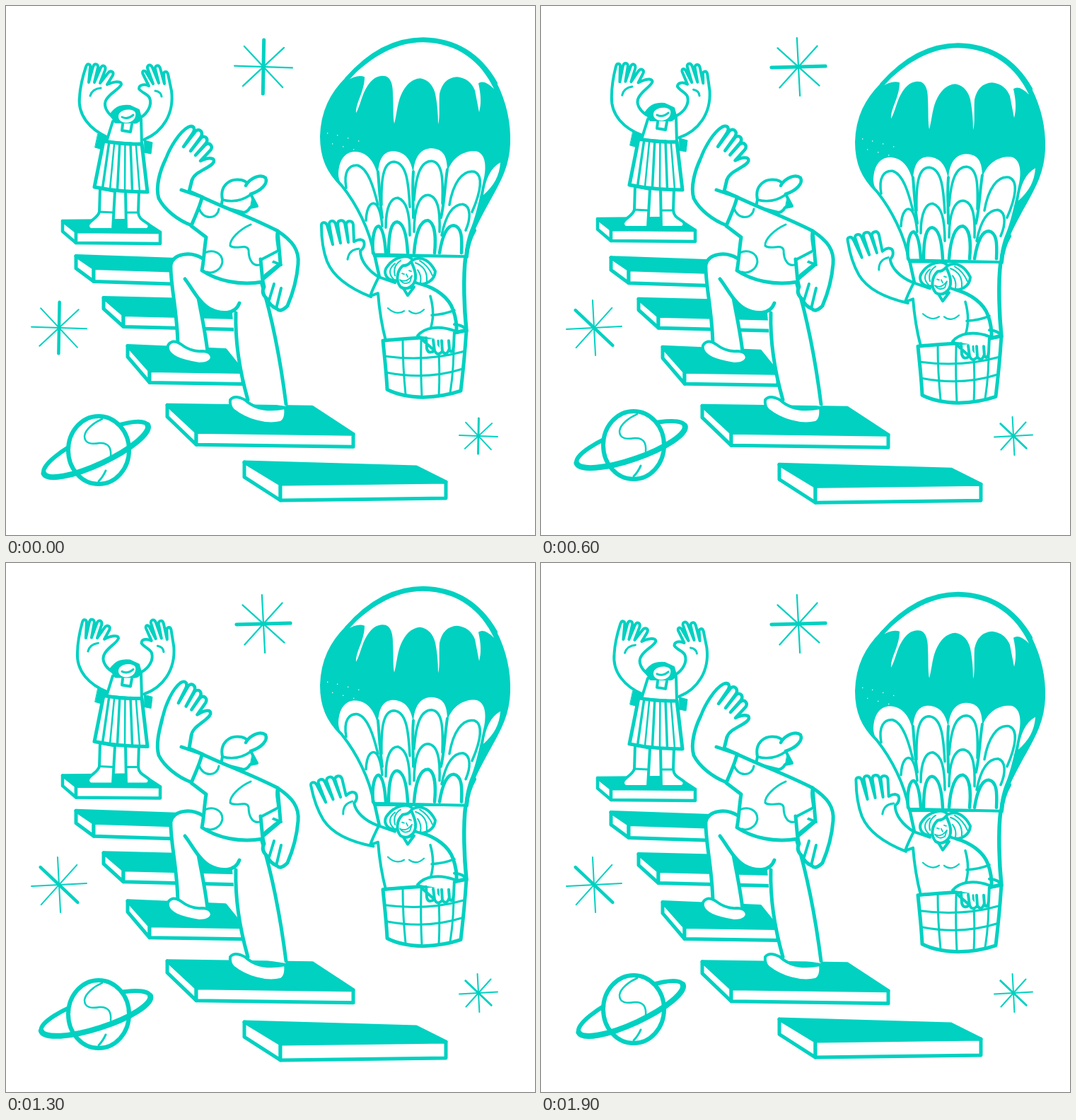
An HTML page with a canvas that plays this animation: 748 px wide and 748 px high, repeating every 2 s.

```html
<!DOCTYPE html>
<html lang="en">
<head>
<meta charset="utf-8">
<title>Stairs and balloon</title>
<style>
html, body { margin: 0; width: 100%; height: 100%; overflow: hidden; background: #fff; }
canvas { display: block; width: 100vmin; height: 100vmin; }
</style>
</head>
<body>
<canvas id="stage" width="748" height="748"></canvas>
<script>
const g = document.getElementById('stage').getContext('2d');
const TEAL = '#00d1c1', WHITE = '#fff', LOOP = 2000, STEP = 100;
const TAU = Math.PI * 2, RAD = Math.PI / 180;
g.lineCap = g.lineJoin = 'round';
g.strokeStyle = TEAL;

// Stroke a path, optionally filling it first.
function ink(d, w, fill) {
  const p = new Path2D(d);
  if (fill) { g.fillStyle = fill; g.fill(p); }
  if (w) { g.lineWidth = w; g.stroke(p); }
}

function moved(dx, dy, draw) {
  g.save();
  g.translate(dx, dy);
  draw();
  g.restore();
}

function turned(x, y, deg, draw) {
  g.save();
  g.translate(x, y);
  g.rotate(deg * RAD);
  g.translate(-x, -y);
  draw();
  g.restore();
}

function turnPoint(px, py, x, y, deg) {
  const c = Math.cos(deg * RAD), s = Math.sin(deg * RAD);
  return [x + (px - x) * c - (py - y) * s, y + (px - x) * s + (py - y) * c];
}

// Smooth interpolation through [time, value] pairs.
function keyed(keys, t) {
  const i = keys.findIndex(k => k[0] > t);
  const [t0, a] = keys[i - 1], [t1, b] = keys[i];
  return a + (b - a) * (1 - Math.cos(Math.PI * (t - t0) / (t1 - t0))) / 2;
}

const WAVE = [[0, 0], [200, -8], [600, -1], [900, -3], [1100, -10], [1600, -4], [1900, 0], [2001, 0]];

// Four spokes; the bold one jumps to a new direction with each pose.
function star(x, y, r, order, bold, thin, pose) {
  const tilt = [2, -2, 3, -3][pose];
  for (let i = 0; i < 4; i++) {
    const heavy = i === order[pose];
    const a = (i * 45 + (heavy ? tilt / 2 : tilt)) * RAD;
    const len = heavy ? r * .93 : i % 2 ? r * .97 : r;
    const dx = Math.cos(a) * len, dy = Math.sin(a) * len;
    ink(`M${x - dx} ${y - dy}L${x + dx} ${y + dy}`, heavy ? bold : thin);
  }
}

function planet(angle) {
  const x = 127, y = 627;
  const ring = (from, to, w) => {
    g.beginPath();
    g.ellipse(x, y, 81, 21, angle * RAD, from, to);
    g.lineWidth = w;
    g.stroke();
  };
  ring(Math.PI, TAU, 6);
  g.beginPath();
  g.ellipse(131, 628, 43, 48, 0, 0, TAU);
  g.fillStyle = WHITE;
  g.fill();
  g.lineWidth = 6;
  g.stroke();
  ink('M136 584C124 589 112 599 111 608C111 619 121 620 132 618C146 617 149 626 148 637', 2.5);
  ink('M141 657Q137 666 131 672', 3);
  ring(0, Math.PI, 8);
}

function slab(bx, by, fx, fy, rx, ry, kx, ky, h, w = 5) {
  const low = h * .92;
  ink(`M${bx} ${by}L${kx} ${ky}L${rx} ${ry}L${fx} ${fy}Z`, w, TEAL);
  ink(`M${bx} ${by}L${fx} ${fy}V${fy + h}L${bx} ${by + low}Z`, w, WHITE);
  ink(`M${fx} ${fy}L${rx} ${ry}V${ry + h}L${fx} ${fy + h}Z`, w, WHITE);
}

function girl(open) {
  ink('M130 181L143 186L140 204L126 200ZM196 190L207 193L205 209L195 207Z', 1, TEAL);
  ink('M133 258L132 291C130 300 118 303 116 310Q116 316 121 316H151L154 262Z', 4, WHITE);
  ink('M169 262L170 316H199Q204 314 202 309C195 303 188 302 187 292L188 260Z', 4, WHITE);
  ink('M132 291L152 292M170 292L187 292', 3);
  turned(146, 188, -4.5 * open, () => {
    ink('M144 186C118 174 101 154 104 128C105 114 109 98 113 86C115 80 120 82 119 87L117 108L123 86C125 80 131 82 130 87L125 108L134 87C137 82 142 85 140 91L133 109L144 95C148 90 153 93 151 98L143 111C152 107 163 105 163 111C160 118 148 122 142 132C137 140 142 150 151 157', 4, WHITE);
    ink('M119 127Q122 117 134 116', 3);
  });
  turned(194, 190, 4.2 * open, () => {
    ink('M195 189C222 178 238 152 234 120L229 96C227 91 222 93 223 98L224 110L218 88C216 82 210 84 211 89L216 109L207 87C204 81 199 84 200 88L208 110L199 95C196 89 191 92 194 97L202 113C196 110 188 111 188 117C192 123 200 124 203 130C207 140 200 152 190 158', 4, WHITE);
    ink('M211 120Q219 121 220 128', 3);
  });
  ink('M151 163L142 192L192 196L191 160Z', 4, WHITE);
  ink('M147 154C156 141 165 140 175 141L188 147L191 158Q187 167 179 165L155 165Z', 2, TEAL);
  ink('M160 152C166 145 180 145 183 151C185 160 176 166 169 165C161 164 157 159 160 152Z', 0, WHITE);
  ink('M164 157Q172 161 180 154', 3);
  ink('M165 167L164 176L176 178L178 167', 4, WHITE);
  ink('M138 191Q166 196 192 195L200 263Q160 263 125 256Z', 5, WHITE);
  for (let i = 1; i < 7; i++) {
    ink(`M${138 + i * 7.6} 194L${126 + i * 10.5} ${257 + i * .8}`, i % 2 ? 3.5 : 2.5);
  }
}

function man(wave) {
  // left leg and shoe
  ink('M278 356C262 347 237 349 233 366C231 388 242 430 243 478L285 492C282 462 278 440 272 415L300 432L362 392L280 372Z', 0, WHITE);
  ink('M278 357C262 347 237 349 233 366C232 392 242 430 243 478M272 413C277 440 282 462 285 489', 5);
  ink('M229 480Q235 470 247 478C256 485 266 489 277 488Q290 488 291 497Q289 506 273 506C250 502 226 496 229 480Z', 4, WHITE);
  // right leg and shoe
  ink('M276 372L255 388L285 428L320 434C323 470 326 512 342 558L396 566C390 505 377 440 362 390Z', 0, WHITE);
  ink('M317 557Q323 549 338 557C352 570 372 573 395 568Q397 585 388 589C368 594 340 586 321 571Q316 566 317 557Z', 4, WHITE);
  ink('M253 386C262 397 273 420 288 428C303 436 324 437 330 420M325 434C324 470 330 515 342 557M361 390C376 440 388 500 396 563', 5);
  // right arm
  ink('M384 318C405 332 415 345 413 365C411 390 404 410 398 424Q388 434 383 428Q373 424 369 414Q360 406 365 397L362 385L388 364Z', 5, WHITE);
  ink('M389 399L382 428M379 393L372 416M362 388L388 366M364 356L389 366', 4);
  // raised arm and hand
  const [jx, jy] = turnPoint(226, 216, 240, 250, wave);
  const [wx, wy] = turnPoint(263, 246, 240, 250, wave);
  ink(`M283 326L262 310C243 303 224 288 216 272C211 255 218 232 ${jx} ${jy}L${wx} ${wy}L259 262L277 270Z`, 0, WHITE);
  ink(`M283 326L262 310C243 303 224 288 216 272C211 255 218 232 ${jx} ${jy}M${wx} ${wy}L259 262L277 270`, 5);
  turned(240, 250, wave, () => {
    ink('M226 216C232 200 245 178 258 171C266 168 268 174 264 180L251 199L268 177C274 172 280 179 275 186L261 205L276 186C283 182 287 189 282 195L268 211L282 196C289 192 293 199 289 204L275 219C285 214 294 214 294 219C294 225 280 230 270 237C265 241 264 243 263 246', 4.5, WHITE);
  });
  // head
  ink('M304 284L306 274C302 254 316 243 333 246C343 248 347 258 347 268L355 283L345 285Q342 291 336 292Z', 4, WHITE);
  ink('M339 254C345 243 360 237 367 243C371 251 361 261 346 266', 4.5, WHITE);
  ink('M306 274Q328 280 347 266', 3.5);
  ink('M348 272L355 283L346 283Z', 1, TEAL);
  // shirt
  ink('M248 260L277 270C305 284 345 298 384 318L386 347L362 384V392C330 395 296 388 277 374L282 328L262 310L276 271', 0, WHITE);
  ink('M248 260L277 270C305 284 345 298 384 318M277 271C274 285 266 300 262 311L283 327C280 345 280 360 277 374C298 388 330 396 363 390L360 358', 5);
  ink('M384 318C381 328 385 336 385 346L362 358', 4);
  ink('M346 309C330 316 316 330 317 339C325 346 340 335 343 345C343 360 350 370 361 365M281 349C292 344 306 348 306 362C304 374 292 379 284 376M273 286C278 303 299 302 301 287', 3);
}

function envelope() {
  const skin = 'M446 185C447 150 460 125 482 103C510 72 545 48 590 48C640 49 672 75 692 110C706 138 712 165 711 195C710 225 700 245 680 280C665 308 655 325 651 355L520 352C515 318 495 280 475 255C455 235 446 215 446 185Z';
  ink(skin, 0, TEAL);
  ink('M481 107Q497 97 507 101C507 122 494 138 495 152C501 142 503 126 511 114Q522 97 537 100Q547 104 547 125C548 145 547 158 549 167C552 158 553 140 558 128Q568 104 586 103Q602 106 607 125Q611 145 611 168C614 160 612 140 613 125Q618 102 638 101Q656 103 663 120L669 151C672 140 672 128 668 110Q676 104 690 118C672 80 640 53 590 52C545 52 512 78 481 107Z', 0, WHITE);
  ink('M470 238C471 213 484 205 497 207C512 209 522 222 526 243C526 215 535 206 548 206C566 207 573 220 576 238C577 212 588 202 602 202C618 203 624 212 624 235C632 212 650 205 664 206C678 208 681 228 674 252C672 262 664 302 656 318C651 332 649 343 649 355L522 352C515 320 499 285 482 262C474 254 470 248 470 238Z', 0, WHITE);
  ink('M699 222C685 230 678 245 675 268C690 255 698 240 699 222Z', 0, WHITE);
  ink('M526 235C528 260 529 280 532 300M576 235C574 260 576 280 576 300M624 232C620 258 620 280 615 300', 4);
  ink('M481 258C477 235 485 225 497 226C512 230 520 258 526 282M531 282C530 240 535 221 549 221C566 223 569 248 571 285M577 275C580 235 588 220 602 220C618 222 618 248 617 280M627 282C632 252 645 232 662 235C675 240 672 262 659 292', 3.5);
  ink('M509 304C510 282 518 276 524 282Q530 290 532 312M537 314C537 283 545 272 554 272C566 276 571 292 571 325M577 320C577 285 585 268 597 268C611 270 614 290 613 320M616 325C622 295 632 281 646 281C658 284 657 302 650 318', 3.5);
  ink('M519 350C517 325 522 312 527 312C534 316 536 335 537 350M541 350C541 322 545 306 553 306C564 308 567 330 568 350M577 350C579 322 586 303 597 304C607 308 608 330 606 350M613 350C617 325 624 311 633 311C645 313 645 330 644 350', 4.5);
  ink(skin, 4);
  ink('M482 104C510 72 545 48 590 48C640 49 672 75 692 110M662 318C655 330 652 342 651 355', 6);
  for (let i = 0; i < 7; i++) {
    g.fillStyle = WHITE;
    g.fillRect(454 + i * 37 % 52, 180 + i * 23 % 27, 1.3, 1.3);
  }
}

function woman(arm) {
  turned(522, 395, arm, () => {
    ink('M527 384C511 374 501 360 501 347C508 342 509 332 501 331C496 331 494 333 492 334L491 310C490 303 482 304 481 309L484 335L479 308C477 302 469 303 469 309L473 336L466 309C464 303 457 304 457 309L462 338L454 311C452 305 445 306 446 312C446 330 448 346 454 362C463 384 486 400 516 412', 4, WHITE);
    ink('M499 344Q485 345 483 359', 3);
  });
  ink('M527 384L514 411L526 408C529 432 532 455 537 474L640 468C639 438 632 422 615 406L585 394Z', 0, WHITE);
  ink('M527 384C522 394 518 402 515 411L526 407C528 432 532 455 537 474M527 384L550 392', 4);
  ink('M587 394C608 400 626 413 632 430Q638 446 637 464', 5);
  ink('M600 411C604 425 606 440 600 458M602 438Q620 437 634 431', 3.5);
  ink('M540 428Q552 439 563 432M570 432Q580 440 591 430', 2.2);
  // hair and face
  ink('M552 389C537 390 532 377 540 368C548 357 568 350 575 360C588 353 600 362 607 376Q606 390 590 394Q580 394 576 389Z', 4, WHITE);
  ink('M562 400L568 410L577 398Z', 4, WHITE);
  ink('M561 368C552 376 551 390 558 398C567 404 578 396 579 386C580 378 577 372 573 362C570 366 566 368 561 368Z', 4, WHITE);
  ink('M557 388Q566 393 574 382L571 391Q563 396 557 388M560 379L563 380M570 375L573 376M566 380L568 384', 1.8);
  ink('M550 365C541 372 541 380 548 387M558 361C550 366 548 374 550 382M579 364C590 368 596 376 595 390M582 374Q588 382 586 392M585 361Q597 368 603 382', 2);
}

function basket() {
  ink('M533 474C560 471 590 470 610 468L651 459C649 490 646 520 643 545Q620 553 590 554Q558 553 539 543C538 520 535 495 533 474Z', 5, WHITE);
  ink('M536 496Q595 504 648 489M538 519Q595 530 645 514', 3);
  ink('M561 473Q561 510 565 550M587 474Q586 515 588 553M611 474Q614 515 612 552M633 468Q634 510 628 548', 3);
  ink('M634 451Q648 452 651 460L636 463', 4);
  ink('M582 467C592 455 612 452 634 460L633 482Q631 494 627 487L626 474M627 485Q623 497 617 489L616 474M617 489Q610 497 606 488L604 473M606 488Q597 494 595 485L594 470Q586 471 582 467Z', 4, WHITE);
}

function balloon(arm) {
  ink('M521 353L649 354L650 462L537 474L527 384Z', 0, WHITE);
  ink('M521 352L528 384M521 354L648 354', 4.5);
  ink('M650 354C646 385 648 430 651 460', 5.5);
  envelope();
  woman(arm);
  basket();
}

function draw(t) {
  const swing = Math.sin(TAU * (t + 50) / LOOP);
  const slow = (1 - Math.cos(TAU * t / LOOP)) / 2;
  const fast = (1 - Math.cos(TAU * t / 1000)) / 2;
  const pose = Math.floor(t * 6 / 1000) % 4;

  g.fillStyle = WHITE;
  g.fillRect(0, 0, 748, 748);

  // spokes: 0 flat, 1 falling, 2 upright, 3 rising
  star(364, 86, 41, [2, 1, 3, 0], 5, 2.2, pose);
  star(75, 455, 39, [2, 0, 3, 1], 4.5, 2, pose);
  star(668, 608, 27, [2, 0, 3, 1], 3, 2, pose);

  moved(0, 1.5 - 9.5 * swing, () => planet(-20.5 - 4.5 * Math.cos(TAU * t / LOOP)));

  moved(0, -4.5 * slow, () => {
    slab(80, 304, 99, 319, 218, 320, 192, 303, 16, 4.5);
    girl(fast);
  });
  moved(0, 3 * swing, () => slab(99, 353, 124, 370, 250, 374, 240, 358, 19));
  moved(0, 2.5 * swing, () => {
    slab(138, 412, 166, 436, 328, 440, 300, 416, 17);
    slab(172, 480, 203, 515, 335, 517, 310, 486, 17);
  });
  moved(0, 1.5 * swing, () => slab(228, 564, 269, 602, 491, 605, 433, 567, 18));
  moved(0, 5 * slow, () => slab(337, 645, 388, 676, 622, 673, 580, 652, 23));
  man(keyed(WAVE, t));

  moved(0, -2.5 + 11 * swing, () => balloon(-14 * slow));
}

let shown = -1;
function tick() {
  const t = Math.floor(performance.now() % LOOP / STEP) * STEP;
  if (t !== shown) draw(shown = t);
  requestAnimationFrame(tick);
}
tick();
</script>
</body>
</html>
```
